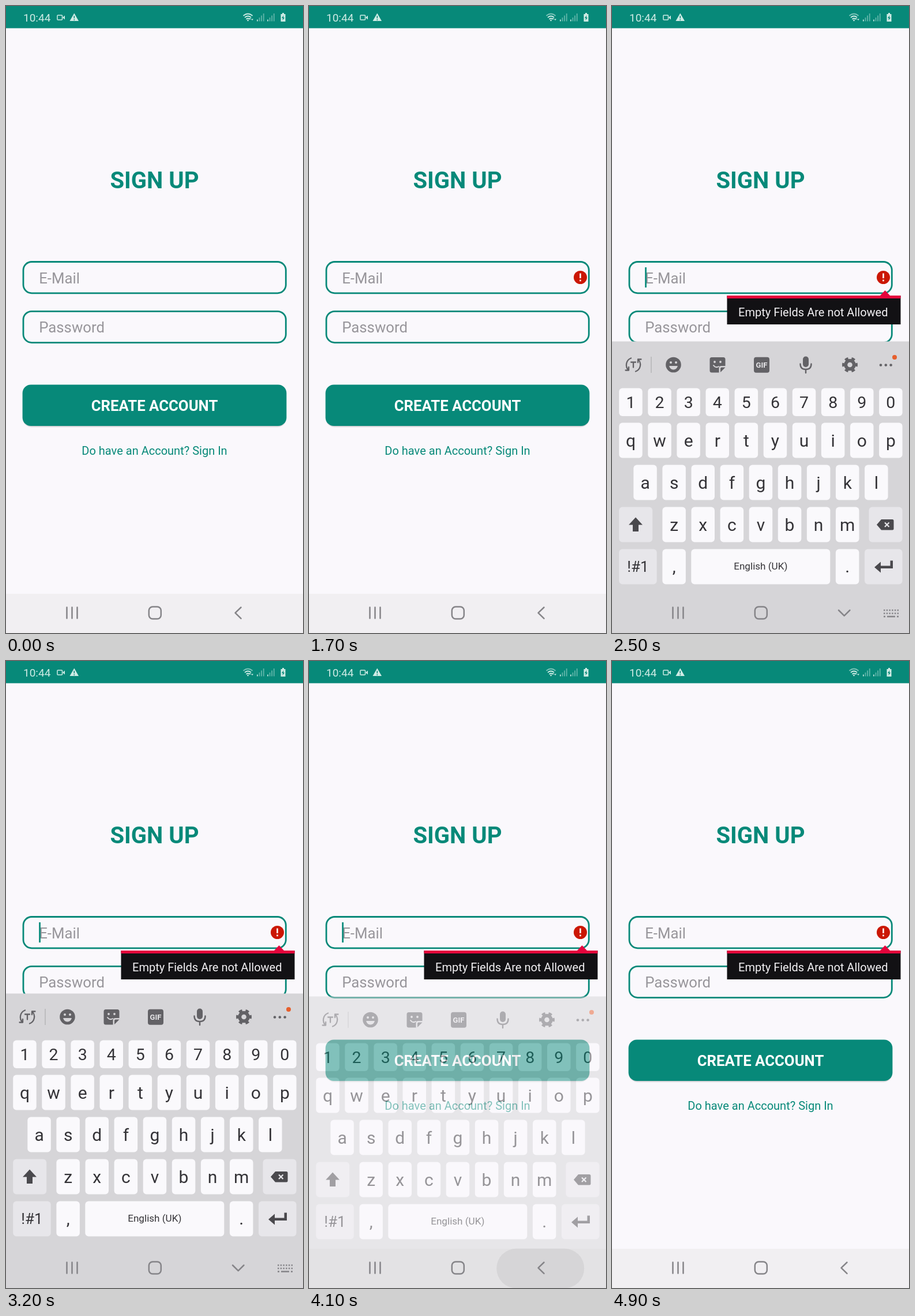
Recreate the animation shown at these times as an HTML page. Size 515 by 1087 pixels, loop 5000 ms.

```html
<!DOCTYPE html>
<html lang="en">
<head>
<meta charset="utf-8">
<title>Sign up form</title>
<style>
  html, body { margin: 0; width: 100%; height: 100%; overflow: hidden; background: #faf8fc; }
  svg { display: block; width: 100%; height: 100%; font-family: Roboto, sans-serif; }
  .mid { text-anchor: middle; }
  .teal { fill: #078979; }
  .field { fill: none; stroke: #078979; stroke-width: 2.8; }
  .hint { fill: #98969b; font-size: 25.75px; }
  .line { fill: none; stroke-linecap: round; stroke-linejoin: round; }
  .nav { stroke: #858488; stroke-width: 2.5; }
  .tool { fill: #636266; }
  .keys { fill: #343337; font-size: 30px; }
</style>
</head>
<body>
<svg viewBox="0 0 515 1087">
  <rect width="515" height="1087" fill="#faf8fc"/>

  <rect width="515" height="38.5" class="teal"/>
  <g fill="#cfebe5">
    <text x="30" y="27" font-size="19">10:44</text>
    <rect x="89" y="16" width="8.5" height="8" rx="1" fill="none" stroke="#cfebe5" stroke-width="1.5"/>
    <path d="M98 20l4-3.5v7z"/>
    <path d="M118.300 12.500l7.700 13.500h-15.500z"/>
    <path d="M118.300 17v4.500m0 1.500v1.700" stroke="#078979" stroke-width="1.500"/>
    <g class="line" stroke="#cfebe5" stroke-width="1.7">
      <path id="wifiOuter" d="M412 16.500q7.500-6 15 0"/>
      <path d="M414.500 19.500q5-4 10 0M417 22.500q2.500-2 5 0"/>
    </g>
    <circle cx="419.500" cy="25" r="1.300"/>
    <path d="M423 20.500l2 2.500h-4zM427 25l-2-2.500h4z"/>
    <g id="signal"></g>
    <path d="M476.500 14h2.500v-2h3v2h2.500v13h-8z"/>
    <path d="M481.500 16l-3.500 5h2l-.500 4 3.500-5h-2z" fill="#078979"/>
  </g>

  <text x="257.500" y="316.300" class="mid teal" font-size="40.06" font-weight="700">SIGN UP</text>
  <rect class="field" x="30" y="443.500" width="455.300" height="54.300" rx="14.500"/>
  <rect class="field" x="30" y="529.300" width="455.300" height="54.300" rx="14.500"/>
  <text class="hint" x="57.200" y="480.500">E-Mail</text>
  <text class="hint" x="57.200" y="566.300">Password</text>
  <rect id="cursor" class="teal" x="57.200" y="453" width="2.700" height="35"/>

  <rect x="29" y="659" width="457" height="71.500" rx="15" fill="#000" opacity=".06"/>
  <rect x="29" y="658" width="457" height="71.500" rx="15" fill="#000" opacity=".1"/>
  <rect x="28.600" y="656.500" width="457.800" height="71.500" rx="14.500" class="teal"/>
  <text x="257.500" y="702" class="mid" font-size="25.75" font-weight="700" fill="#fff">CREATE ACCOUNT</text>
  <text x="257.500" y="778" class="mid teal" font-size="20.03">Do have an Account? Sign In</text>

  <g id="error">
    <circle cx="470.500" cy="470.500" r="11.500" fill="#cb1703"/>
    <path d="M470.500 463.500v8.500m0 2.500v2.700" stroke="#fff" stroke-width="2.600"/>
  </g>
  <g id="popup">
    <rect x="199.500" y="502" width="301" height="50" fill="#121114"/>
    <path d="M199.500 502h265.500l8.500-9 8.500 9h18.500v5h-301z" fill="#e4053c"/>
    <text x="219" y="538" font-size="20.03" fill="#f3f1f4">Empty Fields Are not Allowed</text>
  </g>

  <rect y="1019" width="515" height="68" fill="#f1eff2"/>

  <g id="keyboard">
    <rect y="576.500" width="515" height="520" fill="#d6d5d8"/>
    <g class="tool">
      <g class="line" stroke="#636266" stroke-width="2.300">
        <path d="M33 605.500a12.500 12.500 0 0 0-4 21m0-5.500v5.500h-5.500M41 628.500a12.500 12.500 0 0 0 4-21m0 5.500v-5.500h5.500"/>
        <path d="M33 612.500h8m-4 0v9"/>
      </g>
      <path d="M68 603v28" stroke="#b5b4b7" stroke-width="1.500"/>
      <circle cx="106.500" cy="617" r="13.300"/>
      <g fill="#d6d5d8">
        <circle cx="102" cy="613" r="2"/><circle cx="111" cy="613" r="2"/>
        <path d="M99 619h15q-2 6.500-7.500 6.500t-7.500-6.500z"/>
      </g>
      <path d="M173 604h20q3.500 0 3.500 3.500v11.500h-7q-4 0-4 4v7.500h-12.500q-3.500 0-3.500-3.500v-19.500q0-3.500 3.500-3.500z"/>
      <path d="M188 630v-6.500q0-2 2-2h6.500z"/>
      <g fill="#d6d5d8"><circle cx="178" cy="612" r="1.900"/><circle cx="188" cy="612" r="1.900"/></g>
      <path d="M176 618q4 5 9 2" class="line" stroke="#d6d5d8" stroke-width="2"/>
      <rect x="246" y="603.700" width="27" height="27" rx="4"/>
      <text x="259.500" y="622" class="mid" font-size="13" font-weight="700" fill="#e6e5e8">GIF</text>
      <rect x="331" y="602.500" width="10" height="18.500" rx="5"/>
      <path d="M326.500 615.500q0 9.500 9.500 9.500t9.500-9.500m-9.500 9.500v6" class="line" stroke="#636266" stroke-width="2.400"/>
      <g fill="none" stroke="#636266">
        <circle cx="412.500" cy="617" r="7.300" stroke-width="6"/>
        <circle cx="412.500" cy="617" r="11.200" stroke-width="4.500" pathLength="12" stroke-dasharray="1 1" stroke-dashoffset=".5"/>
      </g>
      <circle cx="466" cy="617.500" r="2.300"/><circle cx="474.800" cy="617.500" r="2.300"/><circle cx="483.600" cy="617.500" r="2.300"/>
      <circle cx="490" cy="604" r="4" fill="#e65f2d"/>
    </g>
    <g id="keys" class="keys mid"></g>
    <g fill="#4a494d">
      <path d="M41 881.500l12 13h-7v11.500h-10v-11.500h-7z"/>
      <path d="M459 894.300l8-9.300h19q2.500 0 2.500 2.500v13.500q0 2.500-2.500 2.500h-19z"/>
      <path d="M473 890.500l7.500 7.500m0-7.500l-7.500 7.500" stroke="#e7e6ea" stroke-width="2.200"/>
      <path d="M455 968l11-9.500v7h16.500v-9h4.500v13.500h-21v7.500z"/>
    </g>
  </g>

  <rect id="pill" y="1018.500" height="69" rx="34.500"/>
  <g class="line nav">
    <path d="M105.500 1042.500v19M114.500 1042.500v19M123.500 1042.500v19"/>
    <rect x="247.800" y="1041.500" width="21" height="21" rx="6.500"/>
    <path id="back" d="M407.500 1042.500l-10 9.700 10 9.700"/>
    <path id="down" d="M393 1047.500l9.700 9.700 9.700-9.700"/>
  </g>
  <g id="switcher" stroke="#858488" stroke-width="2.400">
    <path d="M471 1047.500h26M471 1053h26" stroke-dasharray="2.400 2.320"/>
    <path d="M471 1058.500h3m3 0h14m3 0h3"/>
  </g>
</svg>

<script>
const LOOP = 5000, STEP = 100;
const el = id => document.getElementById(id);
const clamp = v => Math.max(0, Math.min(1, v));

// Status bar signal strength: two sets of four bars
el('signal').innerHTML = [435, 453].map(x => [0, 1, 2, 3].map(i => {
  const h = 3 + i * 3.5;
  return `<rect x="${x + i * 3.6}" y="${26.500 - h}" width="1.8" height="${h}" opacity="${i ? .45 : .9}"/>`;
}).join('')).join('');

function key(x, y, w, h, label = '', baseline = 0, size = 30, fill = '#faf9fc') {
  return `<rect x="${x}" y="${y}" width="${w}" height="${h}" rx="6" fill="${fill}"/>` +
    `<text x="${x + w / 2}" y="${baseline}" font-size="${size}">${label}</text>`;
}
const row = (labels, x, y, h, baseline, size) =>
  [...labels].map((c, i) => key(x + i * 50.1, y, 40.5, h, c, baseline, size)).join('');
const special = (x, y, w, label, baseline) => key(x, y, w, 61, label, baseline, 26, '#e7e6ea');

el('keys').innerHTML =
  row('1234567890', 12.2, 657.5, 48.5, 692, 28.5) +
  row('qwertyuiop', 12.2, 717.5, 61, 759) +
  row('asdfghjkl', 37.3, 790.5, 61, 832) +
  row('zxcvbnm', 87.4, 863.5, 61, 905) +
  special(12.2, 863.5, 58) + special(445.5, 863.5, 58) +
  special(12.2, 936.5, 65.5, '!#1', 976) +
  key(87.4, 936.5, 40.5, 61, ',', 977) +
  key(137.3, 936.5, 241, 61, 'English (UK)', 972, 17.1) +
  key(387.9, 936.5, 40.5, 61, '.', 977) +
  special(438, 936.5, 65.5);

function show(id, opacity) {
  el(id).setAttribute('opacity', Number(opacity));
}

function draw(now) {
  const t = Math.floor((now % LOOP) / STEP) * STEP;
  const keyboardOpen = t >= 2200 && t < 4000;

  show('wifiOuter', t < 1000 ? 1 : .6);
  show('error', t >= 1400);
  show('popup', clamp((t - 2000) / 300));
  show('cursor', t >= 2100 && (t - 2100) % 1000 < 500);

  show('keyboard', t < 2500 ? 0 : clamp((4200 - t) / 200));
  const offset = t < 2600 || t > 4000 ? 5 : 0;
  el('keyboard').setAttribute('transform', `translate(0 ${offset})`);

  show('down', keyboardOpen);
  show('switcher', keyboardOpen);
  show('back', !keyboardOpen);

  // Press highlight spreads under the back button, then fades
  const halfWidth = t < 4000 ? 55 : Math.min(77, 75 + (t - 4000) / 100);
  el('pill').setAttribute('x', 401.2 - halfWidth);
  el('pill').setAttribute('width', halfWidth * 2);
  show('pill', t < 3900 ? 0 : t < 4000 ? .05 : .085 * clamp((4350 - t) / 350));

  requestAnimationFrame(() => draw(performance.now() - start));
}
const start = performance.now();
draw(0);
</script>
</body>
</html>
```
